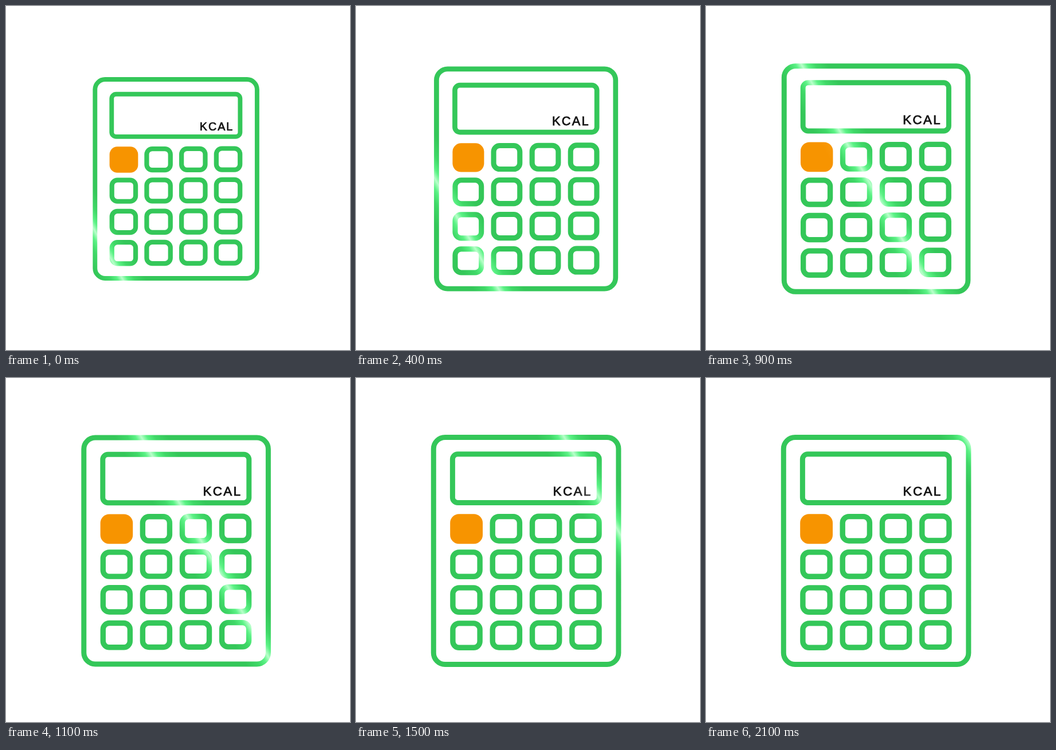
Write an HTML page that moves like this. It is 600 px wide and 600 px high and loops after 2200 ms.

```html
<!DOCTYPE html>
<html lang="en">
<head>
<meta charset="utf-8">
<title>Calorie calculator</title>
<style>
  html, body { margin: 0; width: 100%; height: 100%; overflow: hidden; background: #fff; }
  svg { display: block; width: 100%; height: 100%; }
  .line { fill: none; stroke: url(#green); stroke-width: 9; }
  .key { fill: none; stroke: url(#green); stroke-width: 9.4; }
  text {
    font: 22.5px "Liberation Sans", Arial, sans-serif;
    font-kerning: none;
    letter-spacing: 2.3px;
    fill: url(#ink);
    stroke: url(#ink);
    stroke-width: .8;
  }
</style>
</head>
<body>
<svg viewBox="0 0 600 600">
  <defs></defs>
  <g id="calc">
    <rect class="line" x="135.3" y="103.5" width="322.6" height="396" rx="20"/>
    <rect class="line" x="168.4" y="132.8" width="255.8" height="84.6" rx="9"/>
    <text x="343.6" y="205.2">KCAL</text>
  </g>
</svg>
<script>
const NS = 'http://www.w3.org/2000/svg';
const LOOP = 2200, STEP = 100;
const CX = 296.5, CY = 301.5;
const MID = CX * Math.cos(Math.PI / 6) - CY / 2;  // centre measured along the sweep

// [time, value] keys
const SIZE = [[0, .876], [200, .916], [600, 1], [900, .994], [1300, 1], [2200, 1]];
const SWEEP = [[0, -62], [200, -55.5], [600, 7.5], [900, 93], [1300, 210], [1700, 303.5], [2100, 342], [2200, 344]];

// Colours from the edge of the shine to its centre
const SHINES = {
  green: ['#34c759', '#3fd867', '#5bf285', '#b9ffcb'],
  orange: ['#f79400', '#f99a0b', '#fca01a', '#ffad38'],
  ink: ['#111', '#2b2b2b', '#555', '#8c8c8c']
};
const STOPS = [0, .24, .39, .5];

const calc = document.getElementById('calc');
const defs = document.querySelector('defs');

function add(parent, tag, attrs) {
  const el = document.createElementNS(NS, tag);
  for (const name in attrs) el.setAttribute(name, attrs[name]);
  return parent.appendChild(el);
}

const gradients = Object.entries(SHINES).map(([id, colors]) => {
  const grad = add(defs, 'linearGradient', { id, gradientUnits: 'userSpaceOnUse', x1: -40, x2: 40, y1: 0, y2: 0 });
  const stop = (offset, color) => add(grad, 'stop', { offset, 'stop-color': color });
  STOPS.forEach((at, i) => stop(at, colors[i]));
  for (let i = 2; i >= 0; i--) stop(1 - STOPS[i], colors[i]);
  return grad;
});

for (let row = 0; row < 4; row++) {
  for (let col = 0; col < 4; col++) {
    const x = 164.2 + col * 69.3, y = 237.2 + row * 62 - col * .3;
    if (row + col === 0) {
      add(calc, 'rect', { x, y, width: 56.8, height: 52, rx: 15.5, fill: 'url(#orange)' });
    } else {
      add(calc, 'rect', { class: 'key', x: x + 4.7, y: y + 4.7, width: 47.2, height: 42.4, rx: 11 });
    }
  }
}

// Smooth curve through the keys, flat at turning points
function curve(keys, t) {
  let i = 0;
  while (i < keys.length - 2 && t >= keys[i + 1][0]) i++;
  const rate = k => (keys[k + 1][1] - keys[k][1]) / (keys[k + 1][0] - keys[k][0]);
  const slope = k => {
    if (k === 0) return rate(0);
    if (k === keys.length - 1) return rate(k - 1);
    const a = rate(k - 1), b = rate(k);
    return a * b > 0 ? 2 * a * b / (a + b) : 0;
  };
  const [t0, v0] = keys[i], [t1, v1] = keys[i + 1];
  const d = t1 - t0, p = (t - t0) / d, q = 1 - p;
  return v0 * (1 + 2 * p) * q * q + slope(i) * d * p * q * q
    + v1 * p * p * (3 - 2 * p) - slope(i + 1) * d * p * p * q;
}

function draw(t) {
  const size = curve(SIZE, t);
  const shine = MID + (curve(SWEEP, t) - MID) / size;
  calc.setAttribute('transform', `translate(${CX} ${CY}) scale(${size}) translate(${-CX} ${-CY})`);
  for (const grad of gradients) {
    grad.setAttribute('gradientTransform', `rotate(-30) translate(${shine} 0)`);
  }
}

const start = performance.now();
function tick() {
  const t = (performance.now() - start) % LOOP;
  draw(Math.floor(t / STEP) * STEP);
  requestAnimationFrame(tick);
}
tick();
</script>
</body>
</html>
```
